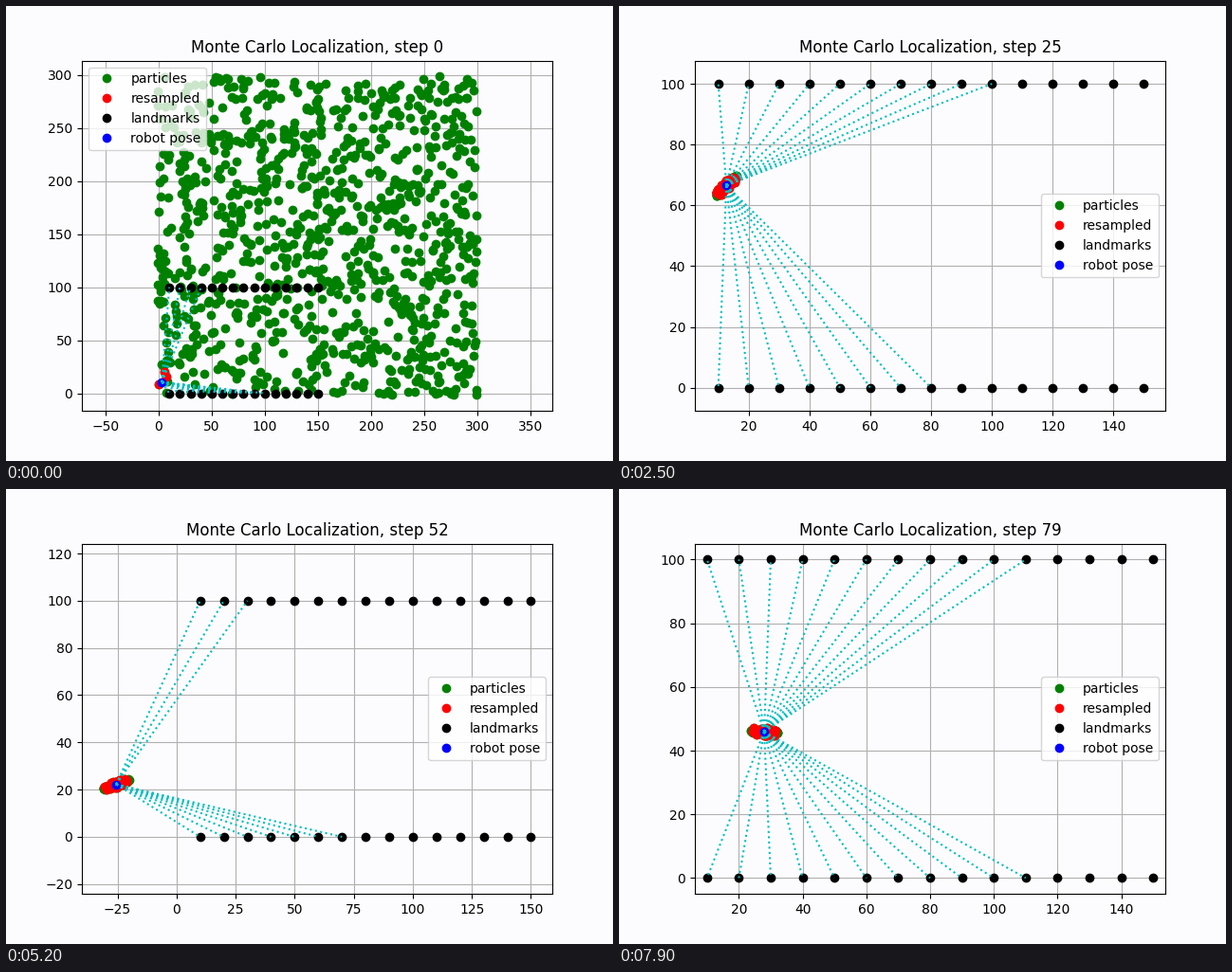
Animation, 640 px wide and 480 px high, one loop 8 s. Source, as a matplotlib script:

```python
import numpy as np
import matplotlib.pyplot as plt
from matplotlib.animation import FuncAnimation

STEPS = 80
SENSOR_RANGE = 100
BACKGROUND = "#fcfcfe"

CENTER = np.array([-1.5, 40.1])  # of the circular drive
RADIUS = 30
TURN = 0.1  # radians per step

columns = np.arange(10, 151, 10)
landmarks = np.array([(x, y) for y in (0, 100) for x in columns], float)


def direction(angle):
    return np.array([np.cos(angle), np.sin(angle)])


def robot_pose(step):
    return CENTER + RADIUS * direction(TURN * step + 0.15 - np.pi / 2)


def initial_cloud():
    """Particles spread over the whole map, and the few that survive."""
    spread = np.random.default_rng(4).uniform(-1.8, 300, (1000, 2))
    survivors = np.array([(0.5, 9), (5.5, 20.5), (7, 15.5)])
    return np.vstack([spread, survivors]), survivors


def tracking_cloud(step):
    """Narrow ellipse of particles that turns with the robot."""
    rng = np.random.default_rng(step)
    pose = robot_pose(step)
    # The first estimate is off to the side; the error fades out.
    center = pose + np.array([5, 1]) * max(0, 1 - step / 25)
    # The estimate is less certain further away from the landmarks.
    half_length = 5 - 0.03 * pose[0]
    half_width = 1.3

    along = np.append(rng.uniform(-1, 1, 70), [-1, 1])
    across = rng.uniform(-1, 1, along.size) * np.sqrt(1 - along**2)
    tilt = np.pi / 4 + TURN * (step - 25)
    points = (center
              + np.outer(half_length * along, direction(tilt))
              + np.outer(half_width * across, direction(tilt + np.pi / 2)))
    return points, points[np.abs(along) < 0.85]


def sight_lines(pose):
    """Segments from the robot to each landmark in range, split by NaN."""
    near = landmarks[np.hypot(*(landmarks - pose).T) < SENSOR_RANGE]
    gap = (np.nan, np.nan)
    return np.array([p for mark in near for p in (pose, mark, gap)])


fig, ax = plt.subplots(figsize=(6.4, 4.8), dpi=100, facecolor=BACKGROUND)
ax.set_facecolor(BACKGROUND)
ax.axis("equal")
ax.grid(True)


def dots(color, label):
    return ax.plot([], [], "o", color=color, label=label)[0]


particles = dots("green", "particles")
resampled = dots("red", "resampled")
dots("black", "landmarks").set_data(*landmarks.T)
robot = dots("blue", "robot pose")
rays, = ax.plot([], [], "c:")
title = ax.set_title("")
legend = ax.legend(loc="center right")


def update(step):
    cloud, kept = tracking_cloud(step) if step else initial_cloud()
    pose = robot_pose(step)
    particles.set_data(*cloud.T)
    resampled.set_data(*kept.T)
    robot.set_data(*pose[:, None])
    rays.set_data(*sight_lines(pose).T)
    title.set_text(f"Monte Carlo Localization, step {step}")
    legend.set_loc("center right" if step else "upper left")
    ax.relim()
    ax.autoscale_view()


anim = FuncAnimation(fig, update, frames=STEPS, interval=100,
                     repeat=True, repeat_delay=0)
plt.show()
```
